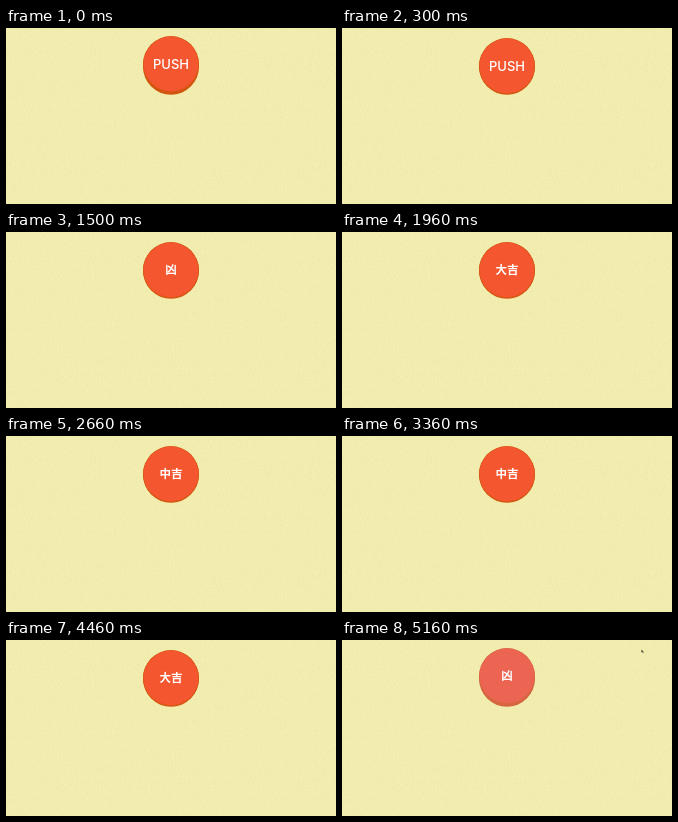
These frames come from a looping animation (330x176 px, 5.26 s). An HTML page with a canvas:

```html
<!DOCTYPE html>
<html lang="ja">
<head>
<meta charset="utf-8">
<title>おみくじボタン</title>
<style>
  html, body { margin: 0; width: 100%; height: 100%; overflow: hidden; background: #f2edb0; }
  canvas { display: block; width: 330px; height: 176px; }
</style>
</head>
<body>
<canvas id="stage" width="330" height="176"></canvas>
<script>
const W = 330, H = 176, LOOP = 5260, EXIT = 5160;
const ctx = document.getElementById('stage').getContext('2d');

// start time in ms, label, pressed
const states = [
  [0, 'PUSH', false], [250, 'PUSH', true],
  [500, '大吉', false], [1000, '大吉', true],
  [1200, '凶', false], [1400, '凶', true],
  [1740, '大吉', false], [1900, '大吉', true],
  [2160, '中吉', false], [2400, '中吉', true],
  [2760, '中吉', false], [3060, '中吉', true],
  [3460, '大吉', false], [3760, '大吉', true],
  [3960, '大吉', false], [4260, '大吉', true],
  [4660, '凶', false], [4860, '凶', true],
  [5060, '凶', false]
];

function seeded(seed) {
  return () => (seed = (seed * 16807) % 2147483647) / 2147483647;
}

// Pale paper with a faint, fine horizontal weave
function makePaper() {
  const paper = document.createElement('canvas');
  paper.width = W;
  paper.height = H;
  const p = paper.getContext('2d');
  const rand = seeded(7);
  p.fillStyle = '#f2edb0';
  p.fillRect(0, 0, W, H);
  for (let y = 0; y < H; y++) {
    const rowTone = rand() * 0.05;
    for (let x = 0; x < W; x += 1 + Math.floor(rand() * 4)) {
      p.fillStyle = `rgba(215,200,110,${rowTone + rand() * 0.07})`;
      p.fillRect(x, y, 1, 1);
    }
  }
  return paper;
}

function disc(y, radius, color) {
  ctx.fillStyle = color;
  ctx.beginPath();
  ctx.arc(165, y, radius, 0, Math.PI * 2);
  ctx.fill();
}

function drawButton(label, pressed, pale) {
  const y = pressed ? 38 : 36;
  const rim = pale ? '#d5663f' : '#d2560f';
  disc(38.8, 28, rim);
  disc(y, 28, rim);
  disc(y, 27.4, pale ? '#eb6552' : '#f4562f');
  ctx.fillStyle = '#fff';
  ctx.textAlign = 'center';
  ctx.font = label === 'PUSH'
    ? '500 13px Inter, "Liberation Sans", sans-serif'
    : 'bold 11.5px "Noto Sans CJK JP", "Noto Sans CJK", sans-serif';
  ctx.fillText(label, 165, y + (label === 'PUSH' ? 5 : 4));
}

function drawCursor(x, y) {
  ctx.fillStyle = '#333';
  ctx.beginPath();
  ctx.moveTo(x, y);
  ctx.lineTo(x, y + 3);
  ctx.lineTo(x + 1, y + 2.5);
  ctx.lineTo(x + 1.6, y + 4);
  ctx.lineTo(x + 2, y + 2.2);
  ctx.fill();
}

const paper = makePaper();
const origin = performance.now();

function draw() {
  const t = (performance.now() - origin) % LOOP;
  const [, label, pressed] = states.findLast(([start]) => start <= t);
  const leaving = t >= EXIT;
  ctx.drawImage(paper, 0, 0);
  drawButton(label, pressed, leaving);
  if (leaving) drawCursor(299.5, 9.5);
  requestAnimationFrame(draw);
}
draw();
</script>
</body>
</html>
```
